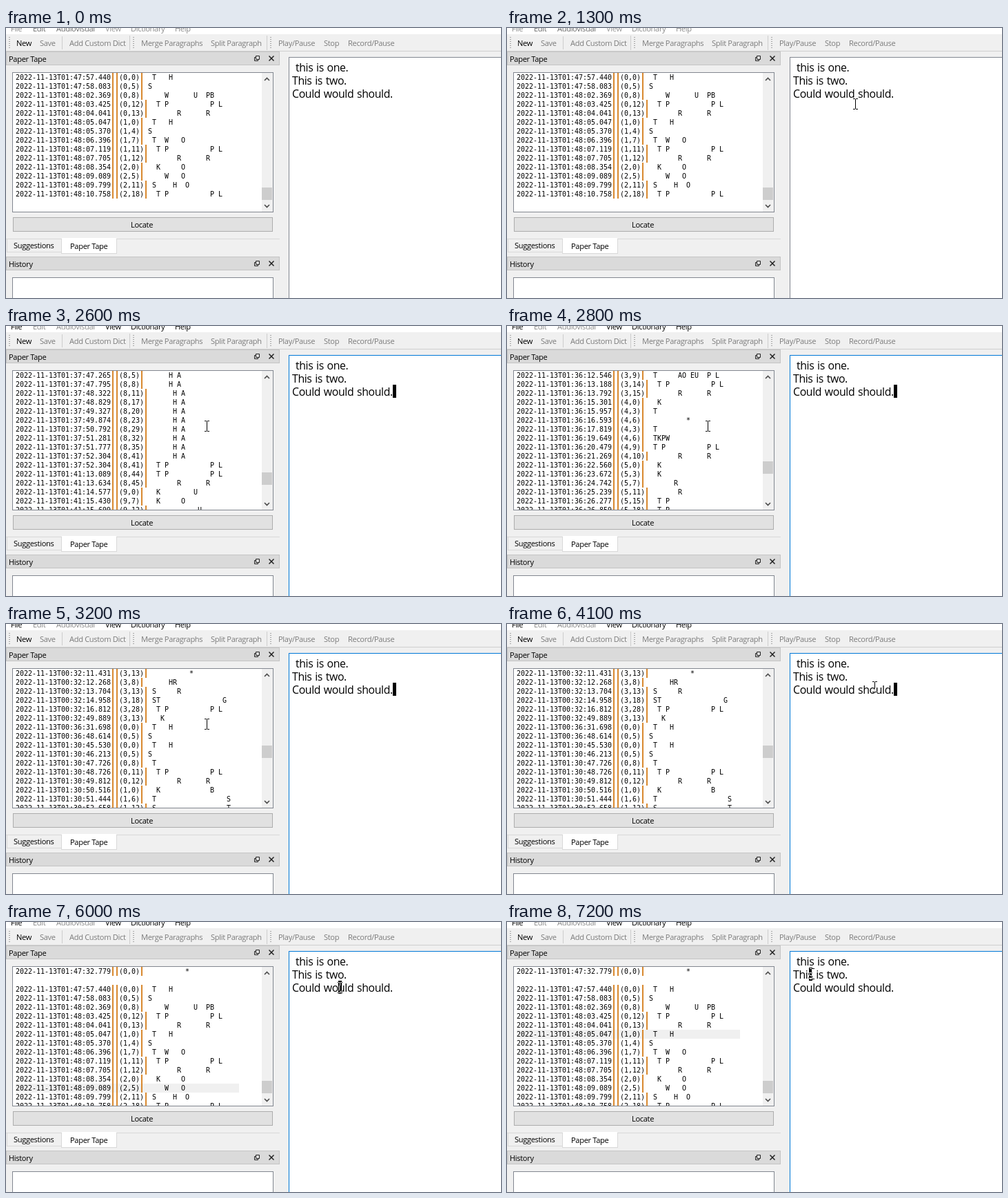
These frames come from a looping animation (718x391 px, 8 s). An HTML page:

```html
<!DOCTYPE html>
<html lang="en">
<head>
<meta charset="utf-8">
<style>
html, body { margin: 0; width: 100%; height: 100%; overflow: hidden; background: #f0f0f0; }
svg { display: block; width: 718px; height: 391px; }
text { font: 11.1px "Open Sans", sans-serif; letter-spacing: -.03em; }
.doc text { font-size: 15.9px; letter-spacing: -.025em; word-spacing: .06em; }
.page text { font: 9.97px "DejaVu Sans Mono", monospace; letter-spacing: 0; }
.invert { mix-blend-mode: difference; }
</style>
</head>
<body>
<svg id="stage" viewBox="0 0 718 391"></svg>
<script>
const KEYS = "#STKPWHRAO*EUFRPBLGTSDZ";
const CHAR = 6, ROW = 13, LEFT = 14, TOP = 65;

const rect = (x, y, w, h, fill, more = "") =>
  `<rect x="${x}" y="${y}" width="${w}" height="${h}" fill="${fill}" ${more}/>`;
const box = (x, y, w, h, fill, line, more = "") =>
  rect(x + .5, y + .5, w - 1, h - 1, fill, `stroke="${line}" ${more}`);
const text = (x, y, s, fill = "#000", more = "") =>
  `<text x="${x}" y="${y}" fill="${fill}" ${more}>${s}</text>`;
const path = (d, line, more = "") =>
  `<path d="${d}" fill="none" stroke="${line}" ${more}/>`;

// Steno tape: every key of a stroke has its own column.
function strokeText(keys) {
  const out = Array(KEYS.length).fill("\xa0");
  let at = -1;
  for (const k of keys) {
    if (k === "-") { at = 12; continue; }
    at = KEYS.indexOf(k, at + 1);
    out[at] = k;
  }
  return out.join("");
}

function tapeRow(line, i) {
  if (!line) return "";
  const [time, pos, keys] = line.split(" ");
  const y = TOP + i * ROW, bar = 26 + pos.length + 1;
  const head = `2022-11-13T${time}\xa0\xa0(${pos})\xa0`;
  return [23, 24, bar].map(c => rect(LEFT + c * CHAR + 2, y, 2, ROW, "#d8882e")).join("") +
    text(LEFT, y + 10, head + strokeText(keys));
}

let seed = 7;
const rand = () => (seed = seed * 16807 % 2147483647) / 2147483647;

// Rows that rush by while the tape scrolls.
function passing(minute, line) {
  const strokes = ["TH", "S", "K", "TPPL", "RR", "HA", "KO", "T"];
  let sec = 4, col = 0;
  return Array.from({ length: 16 }, () => {
    sec += .5 + rand();
    const row = `01:${minute}:${sec.toFixed(3).padStart(6, "0")} ${line},${col} ${strokes[Math.floor(rand() * 8)]}`;
    col += 3;
    if (col > 20) { col = 0; line++; }
    return row;
  });
}

const recent = `01:47:57.440 0,0 TH
01:47:58.083 0,5 S
01:48:02.369 0,8 WUPB
01:48:03.425 0,12 TPPL
01:48:04.041 0,13 RR
01:48:05.047 1,0 TH
01:48:05.370 1,4 S
01:48:06.396 1,7 TWO
01:48:07.119 1,11 TPPL
01:48:07.705 1,12 RR
01:48:08.354 2,0 KO
01:48:09.089 2,5 WO
01:48:09.799 2,11 SHO
01:48:10.758 2,18 TPPL`.split("\n");

const laughs = `01:37:47.265 8,5 HA
01:37:47.795 8,8 HA
01:37:48.322 8,11 HA
01:37:48.829 8,17 HA
01:37:49.327 8,20 HA
01:37:49.874 8,23 HA
01:37:50.792 8,29 HA
01:37:51.281 8,32 HA
01:37:51.777 8,35 HA
01:37:52.304 8,41 HA
01:37:52.304 8,41 TPPL
01:41:13.089 8,44 TPPL
01:41:13.634 8,45 RR
01:41:14.577 9,0 KU
01:41:15.430 9,7 KO
01:41:15.699 9,12 U`.split("\n");

const earlier = `01:36:12.546 3,9 TAOEUPL
01:36:13.188 3,14 TPPL
01:36:13.792 3,15 RR
01:36:15.301 4,0 K
01:36:15.957 4,3 T
01:36:16.593 4,6 *
01:36:17.819 4,3 T
01:36:19.649 4,6 TKPW
01:36:20.479 4,9 TPPL
01:36:21.269 4,10 RR
01:36:22.560 5,0 K
01:36:23.672 5,3 K
01:36:24.742 5,7 R
01:36:25.239 5,11 R
01:36:26.277 5,15 TP
01:36:26.859 5,18 TP`.split("\n");

const oldest = `00:32:11.431 3,13 *
00:32:12.268 3,8 HR
00:32:13.704 3,13 SR
00:32:14.958 3,18 STG
00:32:16.812 3,28 TPPL
00:32:49.889 3,13 K
00:36:31.698 0,0 TH
00:36:48.614 0,5 S
01:30:45.530 0,0 TH
01:30:46.213 0,5 S
01:30:47.726 0,8 T
01:30:48.726 0,11 TPPL
01:30:49.812 0,12 RR
01:30:50.516 1,0 KB
01:30:51.444 1,6 TS
01:30:52.658 1,12 S-T`.split("\n");

const pages = [recent, laughs, passing(37, 6), earlier, passing(33, 1), oldest,
  ["01:47:32.779 0,0 *", "", ...recent]];

// Timelines: the last entry whose time has passed holds.
const scroll = [[0, 0, 231], [2600, 1, 212], [2700, 2, 204], [2800, 3, 196],
  [3100, 4, 186], [3200, 5, 176], [4500, 6, 230]];
const marks = [[0, -1, 0], [4500, 14, 55], [6000, 13, 54], [7200, 7, 54]];
const carets = [[0, -20, 0], [1700, 561, 85], [4500, 534, 85], [6000, 482, 85], [7200, 438, 66]];
const mouse = [[0, -20, 0], [100, 644, 51], [200, 560, 77], [300, 473, 101],
  [1300, 505, 110], [1400, 529, 139], [2200, 420, 136], [2300, 291, 145],
  [3600, 299, 143], [3700, 342, 131], [3800, 405, 111], [3900, 467, 95],
  [4000, 513, 87], [4100, 533, 91], [4200, 538, 95],
  [5500, 530, 95], [5600, 513, 95], [5700, 494, 95], [5800, 484, 95],
  [6700, 478, 92], [6800, 463, 84], [6900, 449, 77], [7000, 442, 75]];
const at = (list, t) => list.findLast(e => e[0] <= t);

const menu = [[7, "File", "#8a8a8a", "#000"], [39, "Edit", "#6a6a6a", "#8a8a8a"],
  [73, "Audiovisual", "#6a6a6a", "#8a8a8a"], [144, "View", "#999", "#000"],
  [181, "Dictionary", "#8a8a8a", "#000"], [245, "Help", "#8a8a8a", "#000"]];
const tools = [[49, "Save"], [92, "Add Custom Dict"], [196, "Merge Paragraphs"],
  [297, "Split Paragraph"], [395, "Play/Pause"], [461, "Stop"], [496, "Record/Pause"]];

const menuBar = active => menu.map(([x, s, off, on]) => text(x, 5, s, active ? on : off)).join("");
const grip = x => path(`M${x} 13V31`, "#a8a8a8", 'stroke-width="2" stroke-dasharray="1 2"');
const dock = (y, title) => box(0, y, 397, 20, "#dadada", "#c4c4c4") +
  text(4, y + 15, title) +
  path(`M362.5 ${y + 8.5}h-2v5h5v-2M362.5 ${y + 6.5}h5v5h-5z`, "#222") +
  path(`M381.5 ${y + 6.5}l7 7m0-7l-7 7`, "#222", 'stroke-width="1.5"');

stage.innerHTML =
  rect(0, 0, 718, 391, "#f0f0f0") + rect(0, 0, 718, 9, "#fff") +
  `<g id="idle">${menuBar(false)}</g><g id="active">${menuBar(true)}</g>` +
  path("M0 33.5H718", "#cfcfcf") + path("M81.5 12V31M179.5 11V32M378.5 11V32", "#cdcdcd") +
  [5, 185, 384].map(grip).join("") +
  text(15, 26, "New") + tools.map(([x, s]) => text(x, 26, s, "#7b7b7b")).join("") +
  dock(34, "Paper Tape") +
  box(9, 64, 379, 203, "#fff", "#828790") +
  `<clipPath id="view">${rect(10, 65, 361, 201, "#000")}</clipPath><g clip-path="url(#view)">` +
  rect(LEFT, 0, 0, ROW, "#f0f0f0", 'id="mark"') +
  pages.map(p => `<g class="page">${p.map(tapeRow).join("")}</g>`).join("") + "</g>" +
  rect(371, 65, 16, 201, "#f0f0f0") + rect(371, 0, 15, 18, "#cdcdcd", 'id="thumb"') +
  path("M375 76l3.5-3.5 3.5 3.5M375 256l3.5 3.5 3.5-3.5", "#505050", 'stroke-width="1.7"') +
  box(10, 274, 377, 21, "#e1e1e1", "#adadad") +
  text(197, 289, "Locate", "#000", 'text-anchor="middle"') +
  path("M0 305.5H397", "#d9d9d9") +
  box(1, 305, 80, 20, "#f0f0f0", "#d9d9d9") + text(11, 319, "Suggestions") +
  box(80, 305, 81, 22, "#fff", "#d9d9d9") + rect(81, 304, 79, 2, "#fff") + text(93, 320, "Paper Tape") +
  dock(331, "History") +
  box(9, 361, 379, 40, "#fff", "#828790") +
  box(410, 42, 320, 360, "#fff", "#828790", 'id="frame"') +
  `<g class="doc">${text(420, 63, "this is one.") + text(415, 82, "This is two.") +
    text(415, 101, "Could would should.")}</g>` +
  rect(0, 0, 5, 19, "#fff", 'id="caret" class="invert"') +
  path("M-3 -7.5H0M1 -7.5H4M.5 -7V7M-3 7.5H0M1 7.5H4", "#fff", 'id="beam" class="invert"');

const el = id => document.getElementById(id);
const set = (id, attrs) => Object.entries(attrs).forEach(([k, v]) => el(id).setAttribute(k, v));
const pageEls = [...document.querySelectorAll(".page")];

function draw(now) {
  const t = now % 8000, focused = t >= 1700;
  const [, page, thumbY] = at(scroll, t);
  const [, row, chars] = at(marks, t);
  const [, cx, cy] = at(carets, t);
  const [, mx, my] = at(mouse, t);
  pageEls.forEach((g, i) => g.style.display = i === page ? "" : "none");
  el("idle").style.display = focused ? "none" : "";
  el("active").style.display = focused ? "" : "none";
  set("frame", { stroke: focused ? "#0078d7" : "#828790" });
  set("thumb", { y: thumbY });
  set("mark", { y: TOP + row * ROW, width: chars * CHAR });
  set("caret", { x: cx, y: cy });
  set("beam", { transform: `translate(${mx} ${my})` });
  requestAnimationFrame(draw);
}
requestAnimationFrame(draw);
</script>
</body>
</html>
```
